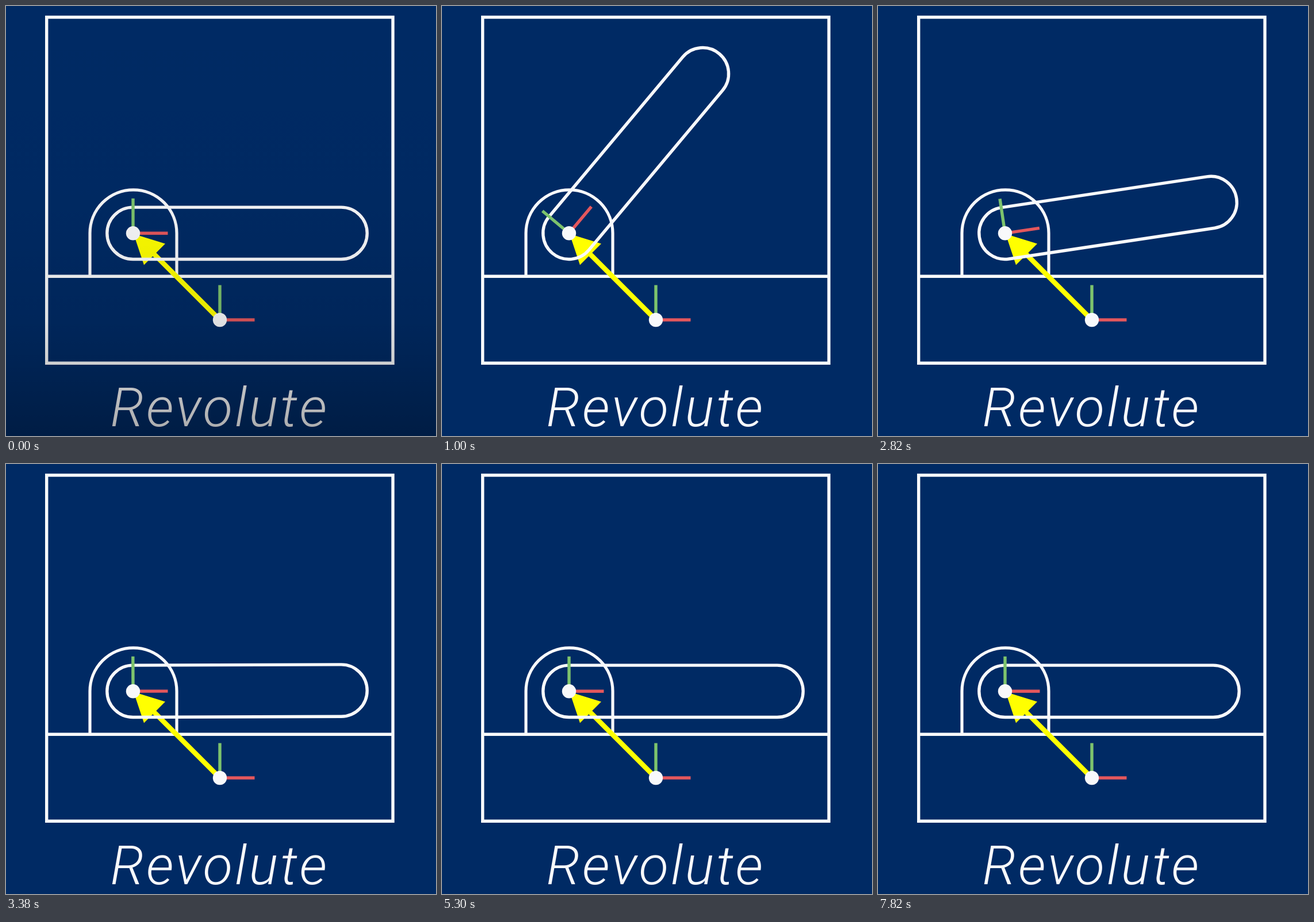
Animation of 748x748 px, one loop 7.92 s. Source, as an HTML page with a canvas:

```html
<!DOCTYPE html>
<html lang="en">
<head>
<meta charset="utf-8">
<title>Revolute joint</title>
<style>
  html, body { margin: 0; width: 100%; height: 100%; overflow: hidden; background: #002a64; }
  canvas { display: block; width: 748px; height: 748px; filter: blur(0.6px); }
</style>
</head>
<body>
<canvas id="stage" width="748" height="748"></canvas>
<script>
const SIZE = 748, LOOP = 7920;
const ctx = document.getElementById('stage').getContext('2d');
const WHITE = '#f8f9fb', RED = '#e4575c', GREEN = '#7dc36d', YELLOW = '#ffff00';
const pivot = { x: 221, y: 395.3 }, base = { x: 372, y: 546 };
const ARM = 362, ARM_R = 45.2, ARCH_R = 75.5, GROUND = 470.3;
const PEAK = 59 * Math.PI / 180;

const clamp = v => Math.min(1, Math.max(0, v));
const sigmoid = v => 1 / (1 + Math.exp(-v));

// Sigmoid easing normalised to run exactly from 0 to 1
function smooth(v) {
  const edge = sigmoid(-5);
  return (sigmoid(10 * (clamp(v) - 0.5)) - edge) / (1 - 2 * edge);
}

function armAngle(t) {
  const up = smooth(t / 1497);
  const down = smooth((t - 1505) / 1953);
  return PEAK * (up - down);
}

function line(x1, y1, x2, y2, color, width) {
  ctx.strokeStyle = color;
  ctx.lineWidth = width;
  ctx.beginPath();
  ctx.moveTo(x1, y1);
  ctx.lineTo(x2, y2);
  ctx.stroke();
}

function outline(width) {
  ctx.strokeStyle = WHITE;
  ctx.lineWidth = width;
  ctx.stroke();
}

function at(p, angle, draw) {
  ctx.save();
  ctx.translate(p.x, p.y);
  ctx.rotate(-angle);
  draw();
  ctx.restore();
}

function axes() {
  line(0, 0, 60.5, 0, RED, 5.4);
  line(0, 0, 0, -60.5, GREEN, 5.4);
}

function dot(p) {
  ctx.fillStyle = WHITE;
  ctx.beginPath();
  ctx.arc(p.x, p.y, 12.2, 0, 7);
  ctx.fill();
}

function body() {
  ctx.beginPath();
  ctx.rect(70.7, 19.5, 602.3, 601.7);
  outline(5.4);
  line(71, GROUND, 673, GROUND, WHITE, 5.4);
  ctx.beginPath();
  ctx.moveTo(pivot.x + 0.5 - ARCH_R, GROUND);
  ctx.arc(pivot.x + 0.5, pivot.y, ARCH_R, Math.PI, 0);
  ctx.lineTo(pivot.x + 0.5 + ARCH_R, GROUND);
  outline(5.2);
}

function arm() {
  ctx.beginPath();
  ctx.arc(0, 0, ARM_R, Math.PI / 2, -Math.PI / 2);
  ctx.arc(ARM, 0, ARM_R, -Math.PI / 2, Math.PI / 2);
  ctx.closePath();
  outline(5.4);
}

function arrow() {
  line(base.x, base.y, 256, 430, YELLOW, 8.6);
  ctx.fillStyle = YELLOW;
  ctx.beginPath();
  ctx.moveTo(222, 396.5);
  ctx.lineTo(277, 413.5);
  ctx.lineTo(240, 450.5);
  ctx.fill();
}

function label() {
  ctx.fillStyle = WHITE;
  ctx.font = 'italic 350 95px Roboto, sans-serif';
  ctx.letterSpacing = '3.9px';
  ctx.fillText('Revolute', 181.5, 730.5);
}

// Dark veil at the bottom that clears right after the loop starts
function shade(t) {
  const k = 1 - clamp(t / 250);
  if (!k) return;
  const g = ctx.createLinearGradient(0, 0, 0, SIZE);
  [[0, 0], [0.4, 0.02], [0.55, 0.05], [0.73, 0.1], [0.83, 0.17], [0.92, 0.25], [1, 0.32]]
    .forEach(([y, a]) => g.addColorStop(y, `rgba(0,0,0,${a * k})`));
  ctx.fillStyle = g;
  ctx.fillRect(0, 0, SIZE, SIZE);
}

function draw(t) {
  const angle = armAngle(t);
  ctx.fillStyle = '#002a64';
  ctx.fillRect(0, 0, SIZE, SIZE);
  body();
  arrow();
  at(pivot, angle, arm);
  at(base, 0, axes);
  at(pivot, angle, axes);
  dot(base);
  dot(pivot);
  label();
  shade(t);
}

const start = performance.now();
function tick() {
  draw((performance.now() - start) % LOOP);
  requestAnimationFrame(tick);
}
tick();
</script>
</body>
</html>
```
